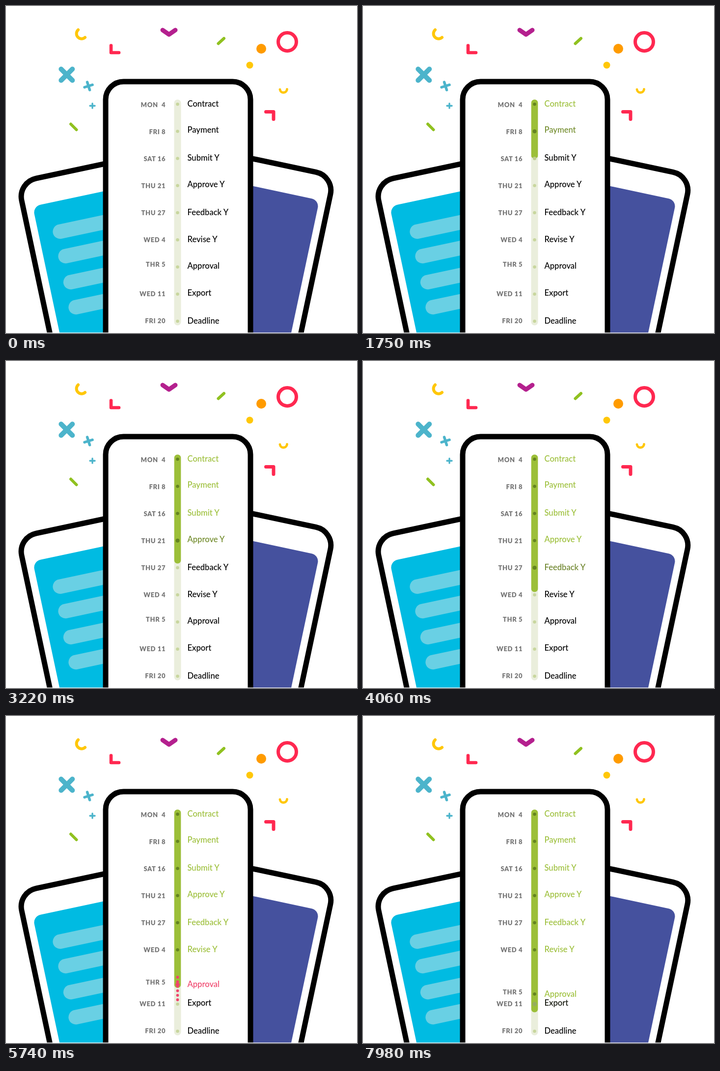
These frames come from a looping animation (715x666 px, 8 s). An HTML page:

```html
<!DOCTYPE html>
<html lang="en">
<head>
<meta charset="utf-8">
<title>Schedule timeline</title>
<style>
  html, body { margin: 0; width: 100%; height: 100%; overflow: hidden; background: #fff; }
  svg { display: block; width: 715px; height: 665px; }
  .date { font: 900 13px Lato, sans-serif; letter-spacing: .65px; fill: #757575; text-anchor: end; }
  .task { font: 500 16.6px Lato, sans-serif; }
  .confetti { fill: none; stroke-linecap: round; stroke-linejoin: round; }
</style>
</head>
<body>
<svg viewBox="0 0 715 665">
  <defs>
    <g id="phone">
      <rect width="330" height="700" rx="38" fill="#fff" stroke="#000" stroke-width="11"/>
      <rect x="19.5" y="54.4" width="300" height="640" rx="16" fill="currentColor"/>
    </g>
    <clipPath id="track"><rect x="342.5" y="190.5" width="14" height="460" rx="7"/></clipPath>
  </defs>

  <g class="confetti">
    <path d="M147 48.5A10.4 10.4 0 1 0 161 64" stroke="#ffc708" stroke-width="6"/>
    <path d="M319 49L332 58L345 49" stroke="#b4208e" stroke-width="9"/>
    <path d="M214 80.5V95H230" stroke="#ff2850" stroke-width="6.6"/>
    <path d="M529.5 215.5H545V230.5" stroke="#ff2850" stroke-width="7"/>
    <path d="M432.5 76.5L444 66M132 240.5L143.5 252" stroke="#90c120" stroke-width="6"/>
    <path d="M558 170A7.3 7.3 0 0 0 572.5 169.5" stroke="#ffc708" stroke-width="4.8"/>
    <g stroke="#4cb4cb">
      <path d="M112.3 128.5L135.2 151.4M135.2 128.5L112.3 151.4" stroke-width="10"/>
      <path d="M165.5 155L170.5 171M160 165.5L176 160.5" stroke-width="5.5"/>
      <path d="M176 198.5V208M171 203.3H181" stroke-width="3.4"/>
    </g>
    <circle cx="573" cy="73" r="18.5" stroke="#ff2850" stroke-width="7"/>
    <circle cx="520" cy="87" r="10" fill="#ff9b00"/>
    <circle cx="496.5" cy="120.5" r="7" fill="#ffc708"/>
  </g>

  <use href="#phone" transform="translate(24 359) rotate(-12)" color="#00bbe2"/>
  <use href="#phone" transform="translate(668.8 346.3) scale(-1 1) rotate(-12)" color="#45519e"/>
  <path d="M110 459.5l117.4-25M121 509.5l117.4-25M131.5 562.5l117.4-25M142 613.5l117.4-25"
    stroke="#69d0e4" stroke-width="29.4" stroke-linecap="round"/>
  <rect x="203" y="154" width="295" height="600" rx="36.5" fill="#fff" stroke="#000" stroke-width="11"/>

  <g clip-path="url(#track)">
    <rect x="342" y="190" width="15" height="461" fill="#eaeedc"/>
    <rect id="bar" x="342.5" y="190" width="14" rx="7" fill="#9cbf39"/>
  </g>
  <g id="trail" fill="#f0446c"></g>
  <g id="rows"></g>
</svg>
<script>
const LOOP = 8000, STEP = 70, FADE = 860;
const BRAKE = 5040;  // the bar slows when it meets the late task
const LATE = 6;
const BLACK = [0, 0, 0], GREEN = [156, 191, 57], DARK = [100, 131, 32],
  PALE = [200, 214, 158], RED = [240, 68, 108];

// date, date baseline, task, task baseline, time the task starts to complete
const rows = [
  ['MON\u00a0\u00a04', 206.4, 'Contract', 204.7, 90],
  ['FRI 8', 261.4, 'Payment', 258.3, 1020],
  ['SAT 16', 316.4, 'Submit Y', 315.3, 1700],
  ['THU 21', 371.4, 'Approve Y', 369, 2490],
  ['THU 27', 426.2, 'Feedback Y', 425.7, 3350],
  ['WED 4', 481, 'Revise Y', 481, 4150],
  ['THR 5', 530.7, 'Approval', 535.2, 6750],
  ['WED 11', 590.8, 'Export', 590.2, 7740],
  ['FRI 20', 645.7, 'Deadline', 647, Infinity]
];

const byId = id => document.getElementById(id);
const ramp = (t, from, to) => Math.max(0, Math.min(1, (t - from) / (to - from)));
const mix = (a, b, k) => a.map((v, i) => v + (b[i] - v) * k);
const rgb = c => `rgb(${c.map(Math.round)})`;

function add(parent, tag, attrs, text = '') {
  const el = document.createElementNS('http://www.w3.org/2000/svg', tag);
  set(el, attrs);
  el.textContent = text;
  return parent.appendChild(el);
}

function set(el, attrs) {
  for (const key in attrs) el.setAttribute(key, attrs[key]);
}

const bar = byId('bar'), trail = byId('trail');
for (let i = 0; i < 6; i++) add(trail, 'circle', { cx: 349.5, cy: 532 + 9.2 * i, r: 2.9 });

const items = rows.map(([date, dateY, task, taskY, start], i) => ({
  date: add(byId('rows'), 'text', { class: 'date', x: 325.2, y: dateY }, date),
  dot: add(byId('rows'), 'circle', { cx: 349.5 }),
  task: add(byId('rows'), 'text', { class: 'task', x: 369.5, y: taskY }, task),
  dateY, taskY, start, dotY: 200 + 55.25 * i
}));

function draw(t) {
  const length = Math.min(t, BRAKE) * .0691 + Math.max(0, t - BRAKE) * .0222;
  const alarm = ramp(t, 4830, 5030) * (1 - ramp(t, 6380, 6590));
  const push = Math.max(0, Math.min(36.5, (t - BRAKE) * .0235));
  bar.setAttribute('height', length);
  trail.setAttribute('opacity', alarm);

  items.forEach((it, i) => {
    const late = i === LATE, red = late ? alarm : 0, shift = late ? push : 0;
    const p = ramp(t, it.start, it.start + FADE) || 0;
    const lit = late ? +(t > 5500) : Math.min(1, p * 1.8);
    set(it.dot, {
      cy: it.dotY + shift * .95,
      r: 3.3 + 1.4 * Math.sin(Math.PI * p) + .9 * red,
      fill: rgb(mix(mix(PALE, DARK, lit), RED, red))
    });
    set(it.task, { y: it.taskY + shift, fill: rgb(mix(mix(BLACK, GREEN, p * p), RED, red)) });
    it.date.setAttribute('y', it.dateY + shift);
  });
}

let origin;
function tick(now) {
  origin ??= now;
  const t = (now - origin) % LOOP;
  draw(Math.floor(t / STEP) * STEP);
  requestAnimationFrame(tick);
}
draw(0);
requestAnimationFrame(tick);
</script>
</body>
</html>
```
